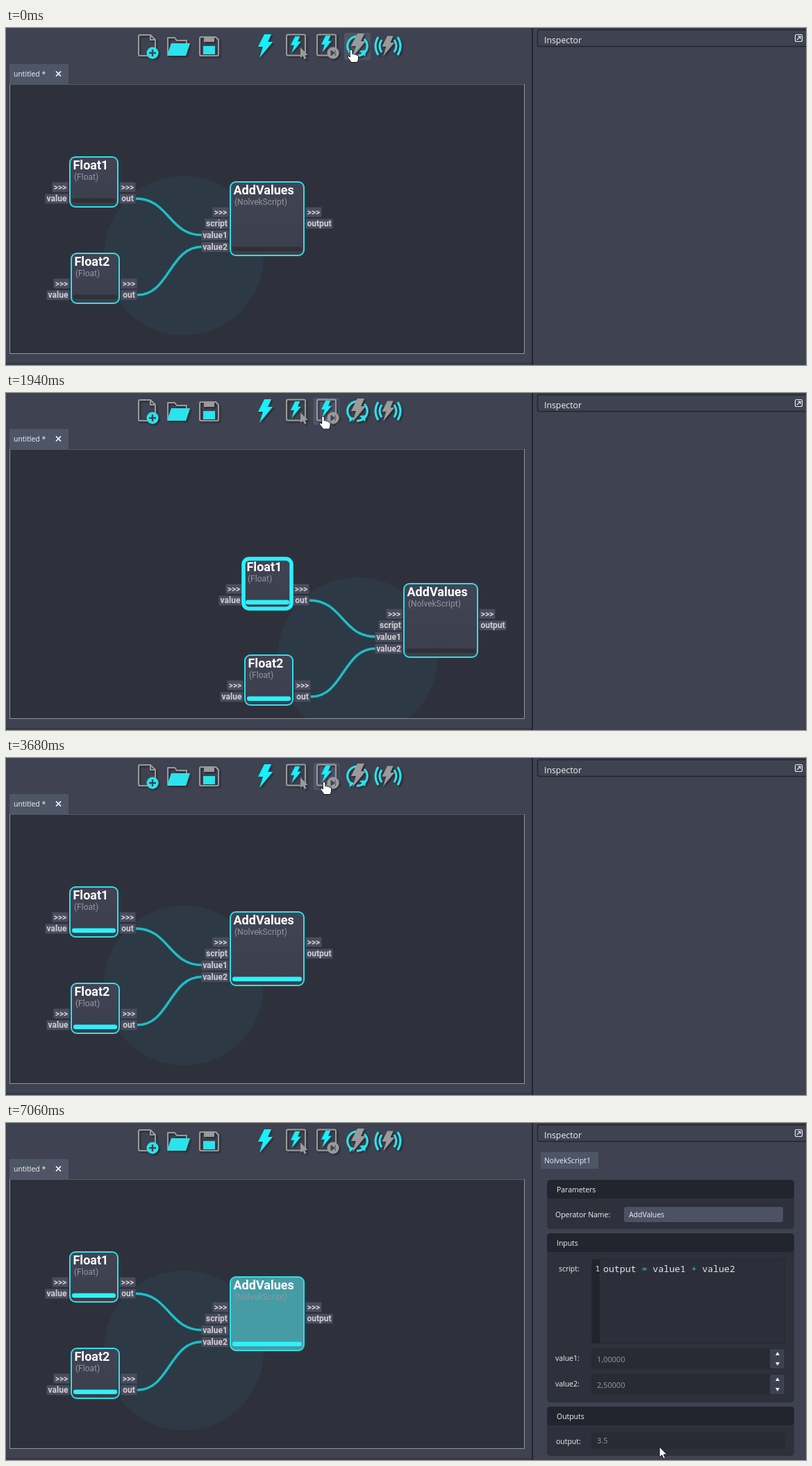
An HTML page for the animation above (7130 ms loop, 1152 by 486 pixels).

```html
<!DOCTYPE html>
<html lang="en">
<head>
<meta charset="utf-8">
<title>Node editor</title>
<style>
  html, body { margin: 0; width: 100%; height: 100%; overflow: hidden; background: #3f4250; }
  svg { display: block; width: 1152px; height: 486px; }
  text { font: 10.45px "Open Sans", "Noto Sans", sans-serif; fill: #f2f3f5; white-space: pre; }
  .title { font: 700 18px Roboto, sans-serif; fill: #fff; }
  .kind { font: 12px Roboto, sans-serif; fill: #94969d; }
  .port { font: 700 12px Roboto, sans-serif; fill: #cfd0d4; }
  .code { font: 13.2px "Noto Sans Mono", "DejaVu Sans Mono", monospace; fill: #e4e6ea; }
  .dim { font-size: 11px; fill: #989aa2; }
  .line { fill: none; stroke: #9a9a9a; stroke-width: 2; stroke-linejoin: round; }
  .arc { fill: none; stroke: #2ae3ec; stroke-width: 3; }
  .wire { fill: none; stroke: #1cbfc7; stroke-width: 3.4; }
</style>
</head>
<body>
<svg id="stage" viewBox="0 0 1152 486" xmlns="http://www.w3.org/2000/svg">
  <defs>
    <path id="bolt" d="M-1-17H9L4-6H11L-8 17-3 1H-10Z"/>
    <clipPath id="view"><rect x="6" y="82" width="740" height="387"/></clipPath>
    <filter id="shade" x="-20%" y="-20%" width="150%" height="150%">
      <feDropShadow dx="2" dy="2" stdDeviation=".8" flood-color="#20222a" flood-opacity=".8"/>
    </filter>
    <linearGradient id="nodeFill" x2="0" y2="1">
      <stop stop-color="#414454"/><stop offset="1" stop-color="#3b3e4c"/>
    </linearGradient>
  </defs>

  <rect width="1152" height="486" fill="#3f4250"/>
  <rect y="483" width="757" height="2" fill="#353843"/>
  <rect x="757" width="2" height="486" fill="#23252e"/>

  <rect id="button" y="7" width="38" height="39" rx="3"/>
  <g id="tools" filter="url(#shade)">
    <path class="line" d="M193 10H208L215 17V38Q215 40 213 40H193Q191 40 191 38V12Q191 10 193 10ZM208 10V17H215"/>
    <circle cx="211" cy="36" r="8.5" fill="#2ae3ec"/>
    <path d="M211 31V41M206 36H216" stroke="#3a4450" stroke-width="2.4"/>

    <path class="line" d="M233 38V14H243L246 18H260V22"/>
    <path d="M238 22H265L259 40H232Z" fill="#2ae3ec"/>

    <path class="line" d="M281 13H302L306 17V38Q306 40 304 40H281Q279 40 279 38V15Q279 13 281 13Z"/>
    <path d="M285 13H300V20H285Z" fill="#9a9a9a"/>
    <path d="M284 26H301V38H284Z" fill="#2ae3ec"/>

    <use href="#bolt" x="373" y="26" fill="#12f0fa"/>

    <rect class="line" x="404" y="9.5" width="27" height="30" rx="2"/>
    <use href="#bolt" transform="translate(417 24) scale(.7)" fill="#12f0fa"/>
    <path d="M424 28V43L427.500 40 430 45 432.500 43.500 430 39H434.500Z" fill="#9a9a9a"/>

    <rect class="line" x="448" y="9.500" width="27" height="30" rx="2"/>
    <use href="#bolt" transform="translate(461 23) scale(.7)" fill="#12f0fa"/>
    <circle cx="471" cy="36" r="8.500" fill="#9a9a9a"/>
    <path d="M468 32L473 36 468 40ZM474 32V40" fill="#3f4250" stroke="#3f4250"/>

    <path class="arc" d="M497 37A14 14 0 0 1 506 12M516 16A14 14 0 0 1 505 40"/>
    <path d="M509 33L518 32 517 41ZM494 34L502 36 495 42Z" fill="#2ae3ec"/>
    <use href="#bolt" x="507" y="25" fill="#9a9a9a"/>

    <path class="arc" d="M541 17Q535 26 541 35M536 13Q528 26 536 39M559 17Q565 26 559 35M564 13Q572 26 564 39"/>
    <use href="#bolt" transform="translate(550 26) scale(.85)" fill="#9a9a9a"/>
  </g>

  <rect x="5" y="52" width="85" height="30" fill="#4e5566"/>
  <text x="11" y="70">untitled *</text>
  <path d="M72 62.500L79 69.500M79 62.500L72 69.500" stroke="#fff" stroke-width="1.700"/>
  <rect x="5.500" y="81.500" width="741" height="388" fill="#2e313b" stroke="#92949c"/>
  <path d="M6 81.500H746" stroke="#555862"/>

  <g clip-path="url(#view)">
    <g id="scene"><circle cx="256" cy="328" r="115" fill="#2d3a45"/></g>
  </g>

  <rect x="765.500" y="2.500" width="390" height="24" rx="2" fill="none" stroke="#23252e" stroke-width="1.500"/>
  <text x="775" y="21.500" style="font-size:12.300px">Inspector</text>
  <rect x="1136.500" y="9.500" width="10" height="10" rx="2" fill="none" stroke="#e8e9ec" stroke-width="1.200"/>
  <path d="M1139 17L1144 12M1140 12H1144V16" fill="none" stroke="#e8e9ec" stroke-width="1.200"/>
  <g id="inspector"></g>
  <g id="cursor" stroke="#15161a" stroke-linejoin="round" fill="#fff">
    <path id="arrow" d="M0 0V15L3.500 11.800 6 17.300 8.400 16.200 6 11H10.700Z" stroke-width="1"/>
    <path id="hand" d="M-1.800 1.200Q0-1 1.800 1.200V6.500Q4 5.500 5 7.200 7 6.300 8 8.200 10.500 7.800 10.500 10V13Q10.500 15 9 18.500H0Q-2 15-5 11.500-5.500 9-3.500 9.500L-1.800 11Z" stroke-width="1"/>
  </g>
</svg>

<script>
const LOOP = 7130;
const $ = id => document.getElementById(id);

function add(parent, tag, attrs, text) {
  const el = document.createElementNS('http://www.w3.org/2000/svg', tag);
  for (const k in attrs) el.setAttribute(k, attrs[k]);
  if (text) el.textContent = text;
  parent.append(el);
  return el;
}
const box = (p, x, y, width, height, fill, rx = 0) => add(p, 'rect', { x, y, width, height, fill, rx });
const label = (p, x, y, s, cls = '') => add(p, 'text', { x, y, class: cls }, s);

// Nodes and wires
const scene = $('scene');
const wire = (x, y, x2, y2) =>
  add(scene, 'path', { class: 'wire', d: `M${x} ${y}C${(x + x2) / 2} ${y} ${(x + x2) / 2} ${y2} ${x2} ${y2}` });
wire(187, 246, 282, 298.5);
wire(189, 385, 282, 315.5);

function port(edge, cy, text, width, side) {
  const x = side < 0 ? edge - width : edge;
  box(scene, x, cy - 7, width, 14, '#4b4d5e', 1);
  const t = label(scene, x + width / 2, cy + 4, text, 'port');
  t.setAttribute('text-anchor', 'middle');
}

function node(x, y, w, h, title, kind, inputs, outputs) {
  const firstPort = y + 43.5;
  inputs.forEach(([s, pw], i) => port(x - 2.5, firstPort + i * 16.8, s, pw, -1));
  outputs.forEach(([s, pw], i) => port(x + w + 2.5, firstPort + i * 16.8, s, pw, 1));
  const frame = box(scene, x, y, w, h, 'url(#nodeFill)', 8);
  label(scene, x + 4.5, y + 17.5, title, 'title');
  label(scene, x + 6, y + 33, kind, 'kind');
  const bar = box(scene, x + 3, y + h - 12.5, w - 6, 6.5, '#2f3136', 3);
  return { frame, bar };
}
const run = ['>>>', 23];
const floatIn = [run, ['value', 33]], floatOut = [run, ['out', 23]];
const nodes = [
  node(92, 186, 69, 72, 'Float1', '(Float)', floatIn, floatOut),
  node(94, 325, 69, 72, 'Float2', '(Float)', floatIn, floatOut),
  node(323, 222, 106, 106, 'AddValues', '(NolvekScript)',
    [run, ['script', 34], ['value1', 39], ['value2', 39]], [run, ['output', 39]])
];

// Inspector panels
const panel = $('inspector');
function group(y, h, title) {
  box(panel, 779, y, 356, h, '#2e313b', 5);
  box(panel, 779, y, 356, 27, '#23252e', 5);
  label(panel, 793, y + 18, title);
}
function field(y, w, h) {
  box(panel, 843, y, w, h, '#282b34', 3);
}
function spinner(y, name, value) {
  label(panel, 791, y + 18, name);
  field(y, 279, 30);
  box(panel, 1100, y + 1, 21, 28, '#3e4150', 2);
  add(panel, 'path', {
    d: `M1108 ${y + 10}h6l-3-5zM1108 ${y + 20}h6l-3 5z`, fill: '#eceef0'
  });
  label(panel, 851, y + 20, value, 'dim');
}
box(panel, 770, 42, 83, 24, '#4e5566');
label(panel, 775, 58, 'NolvekScript1');
group(82, 71, 'Parameters');
label(panel, 791, 136, 'Operator Name:');
box(panel, 890, 121, 229, 22, '#4c5263', 3);
label(panel, 897, 135.5, 'AddValues');
group(159, 244, 'Inputs');
label(panel, 796, 214, 'script:');
add(panel, 'rect', { x: 843.5, y: 196.5, width: 278, height: 121, rx: 2, fill: '#2c2f39', stroke: '#252831' });
box(panel, 844, 197, 11, 121, '#22242d');
label(panel, 848.5, 214, '1', 'code').style.fontSize = '11.5px';
const code = label(panel, 860, 215, '', 'code');
for (const part of ['output ', '=', ' value1 ', '+', ' value2'])
  add(code, 'tspan', part.length === 1 ? { fill: '#2fc3cf' } : {}, part);
spinner(325, 'value1:', '1,00000');
spinner(362, 'value2:', '2,50000');
group(409, 71, 'Outputs');
label(panel, 792, 463, 'output:');
field(446, 279, 24);
label(panel, 851, 462, '3.5', 'dim');

// Timeline
const linear = p => p;
const easeIn = p => p ** 1.3;
const easeOut = p => 1 - (1 - p) ** 1.5;
const smooth = p => p * p * (3 - 2 * p);

// first step, last step, step count, end x, end y, easing
const moves = [
  [60, 130, 2, 456, 33, easeOut],
  [1750, 2080, 6, 457, 34, linear],
  [2340, 2340, 1, 458, 34, linear],
  [4740, 5210, 8, 388, 257, smooth],
  [5540, 5600, 2, 375, 245, linear],
  [6060, 6060, 1, 394, 260, linear],
  [6130, 6730, 10, 828, 464, easeIn],
  [6800, 7060, 5, 941, 467, easeOut]
];
// time, scene x, scene y, active node
const views = [[0, 0, 0, -1], [1070, 248, -86, 1], [1750, 250, 53, 0], [3550, 0, 0, 2], [3680, 0, 0, -1]];
const doneAt = [1820, 1130, 3620];
const presses = [[530, 660], [3010, 3150]];
const SELECT = 5400;

function pointer(t) {
  let x = 497, y = 31;
  for (const [start, end, n, tx, ty, ease] of moves) {
    if (t < start) break;
    const done = Math.floor((t - start) / Math.max(1, end - start) * (n - 1) + 0.1) + 1;
    const p = ease(Math.min(n, done) / n);
    x += (tx - x) * p;
    y += (ty - y) * p;
  }
  return [x, y];
}

function draw(t) {
  const [x, y] = pointer(t);
  const overTool = y < 46;
  $('cursor').setAttribute('transform', `translate(${x} ${y})`);
  $('hand').style.display = overTool ? '' : 'none';
  $('arrow').style.display = overTool ? 'none' : '';

  const pressed = presses.some(([a, b]) => t >= a && t < b);
  $('button').style.display = overTool ? '' : 'none';
  $('button').setAttribute('x', x > 484 ? 487 : 442.5);
  $('button').setAttribute('fill', pressed ? '#596074' : '#4e5567');

  const [, dx, dy, active] = views.filter(v => v[0] <= t).pop();
  scene.setAttribute('transform', `translate(${dx} ${dy})`);
  nodes.forEach(({ frame, bar }, i) => {
    frame.setAttribute('stroke', i === active ? '#2bf2fb' : '#2fdfe8');
    frame.setAttribute('stroke-width', i === active ? 5.5 : 2);
    bar.setAttribute('fill', t >= doneAt[i] ? '#2bf2fb' : '#2f3136');
  });

  const over = x > 323 && x < 429 && y > 222 && y < 328;
  const selected = t >= SELECT;
  nodes[2].frame.setAttribute('fill',
    selected ? (over ? '#4fabb5' : '#459ca5') : over ? '#4f5566' : 'url(#nodeFill)');
  panel.style.display = selected ? '' : 'none';
}

const begin = performance.now();
function tick() {
  draw((performance.now() - begin) % LOOP);
  requestAnimationFrame(tick);
}
tick();
</script>
</body>
</html>
```
